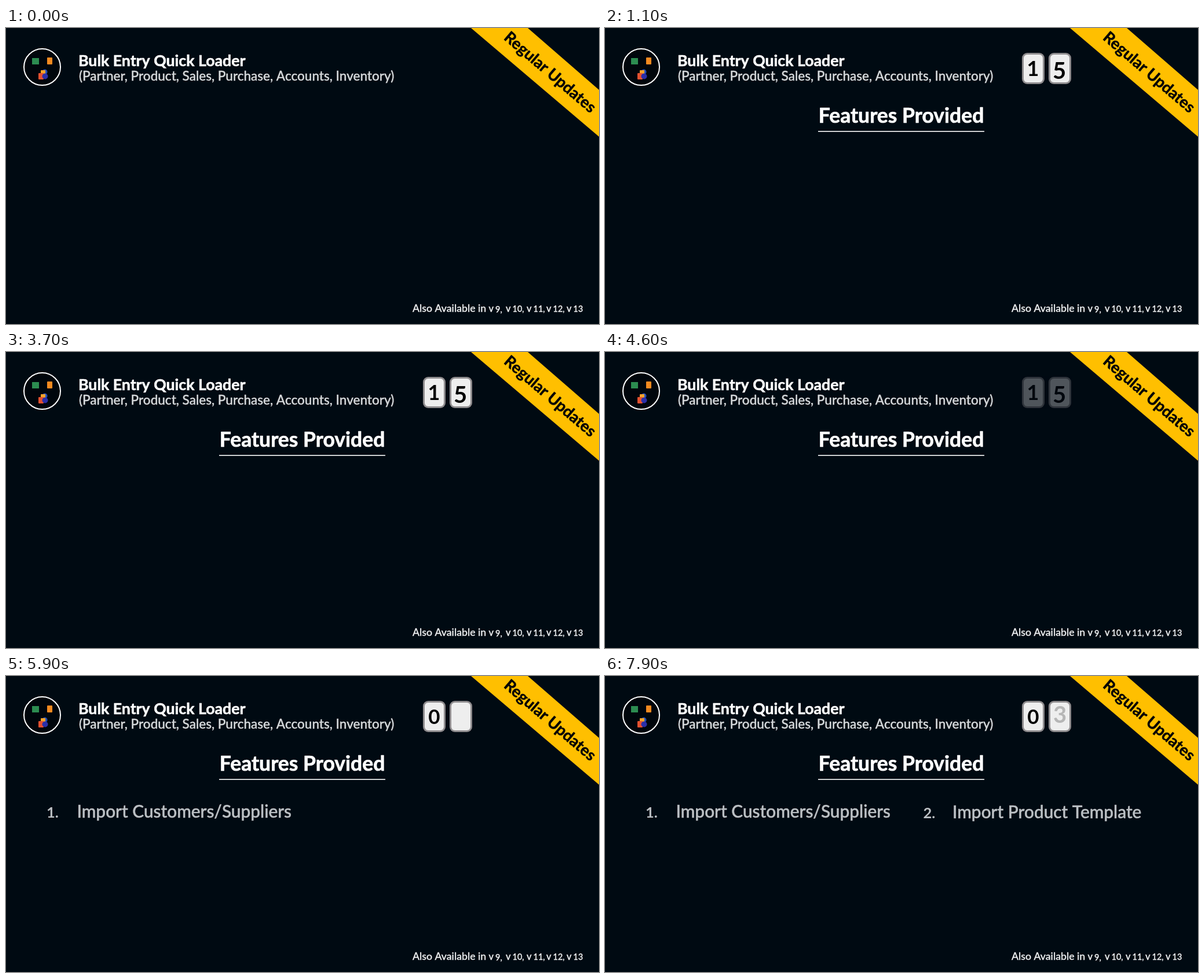
Animation, 1024 px wide and 512 px high, one loop 8 s. Source, as an HTML page with a canvas:

```html
<!DOCTYPE html>
<html lang="en">
<head>
<meta charset="utf-8">
<title>Features Provided</title>
<style>
  html, body { margin: 0; width: 100%; height: 100%; overflow: hidden; background: #000a12; }
  canvas { display: block; }
</style>
</head>
<body>
<canvas id="stage" width="1024" height="512"></canvas>
<script>
const ctx = document.getElementById('stage').getContext('2d');
const LOOP = 8000, STEP = 100;
const BG = '#000a12', WHITE = '#ffffff', SOFT = '#d6d8da', ITEM = '#bcc0c4', AMBER = '#ffbf00';

// size and baseline of the counter digits, with low-hanging 3 and 5
const DIGITS = { 0: [35, 83], 1: [36, 83], 2: [36, 84], 3: [40, 89], 5: [40, 88] };

// bold is the width of an outline that thickens the letters
function text(str, x, y, size, weight, color, align = 'left', bold = 0) {
  ctx.font = `${weight} ${size}px Lato, "Open Sans", sans-serif`;
  ctx.fillStyle = ctx.strokeStyle = color;
  ctx.textAlign = align;
  ctx.fillText(str, x, y);
  if (bold) {
    ctx.lineWidth = bold;
    ctx.lineJoin = 'round';
    ctx.strokeText(str, x, y);
  }
}

function box(x, y, w, h, r, color) {
  ctx.fillStyle = color;
  ctx.beginPath();
  ctx.roundRect(x, y, w, h, r);
  ctx.fill();
}

function disc(x, y, r, color) {
  ctx.fillStyle = color;
  ctx.beginPath();
  ctx.arc(x, y, r, 0, Math.PI * 2);
  ctx.fill();
}

function withAlpha(alpha, draw) {
  if (alpha <= 0) return;
  ctx.save();
  ctx.globalAlpha = alpha;
  draw();
  ctx.restore();
}

// stepped rise from 0 to 1 over n ticks; the first tick is already visible
function ramp(t, start, n) {
  const k = Math.floor((t - start) / STEP) + 1;
  return Math.min(Math.max(k, 0), n) / n;
}

function badge() {
  disc(62.5, 67.5, 31.5, '#00060c');
  ctx.strokeStyle = WHITE;
  ctx.lineWidth = 2;
  ctx.stroke();
  box(45, 52, 12, 11, 0, '#2c8c50');
  box(71, 51, 9, 12, 1, '#f58a1f');
  disc(67, 76, 4.5, '#2450b8');
  box(60, 73, 8, 9, 1, '#f9a42b');
  box(56, 78, 9, 11, 1, '#e4512f');
  disc(67.5, 83.5, 5, '#2b2fa8');
}

function ribbon() {
  ctx.fillStyle = AMBER;
  ctx.beginPath();
  ctx.moveTo(803, 0);
  ctx.lineTo(901, 0);
  ctx.lineTo(1024, 107);
  ctx.lineTo(1024, 188);
  ctx.fill();
  ctx.save();
  ctx.translate(933.6, 83.4);
  ctx.rotate(40.6 * Math.PI / 180);
  text('Regular Updates', 0, 0, 27.2, 700, '#050505', 'center', 0.5);
  ctx.restore();
}

function footer() {
  const put = (str, x, y, size) => text(str, x, y, size, 500, '#eeeff0', 'left', 0.35);
  put('Also Available in', 702, 490.5, 17.7);
  [[9, 833.5], [10, 863], [11, 899], [12, 933], [13, 968]].forEach(([n, x]) => {
    put('v', x, 490.5, 16.5);
    put(n < 13 ? n + ',' : n, x + 11.5, n === 9 ? 492 : 490.5, 14.5);
  });
}

function heading(t) {
  withAlpha(ramp(t, 100, 4), () => {
    text('Features Provided', 511.5, 163.5, 35.5, 700, WHITE, 'center', 0.7);
    ctx.fillRect(368, 178, 287, 1.6);
  });
}

function card(x) {
  box(x, 43, 39, 54, 9, '#8f8c8e');
  box(x + 3, 46, 33, 48, 6, '#eeeeee');
}

function digit(d, x, dy = 0, alpha = 1) {
  const [size, base] = DIGITS[d];
  withAlpha(alpha, () => text(String(d), x, base + dy, size, 700, '#030303', 'center'));
}

// the old digit sinks and fades, then the next one drops in
function roll(from, k) {
  if (k <= 0) digit(from, 785.5);
  else if (k < 3) digit(from, 785.5, 5 * k, 1 - k / 3);
  else if (k > 3) {
    const p = Math.min((k - 3) / 3, 1);
    digit(from + 1, 785.5, -12 * (1 - p), p ** 1.3);
  }
}

function counter(t) {
  const total = t < 4800;
  const alpha = total ? ramp(t, 900, 3) - ramp(t, 4500, 3) : ramp(t, 4900, 4);
  if (alpha <= 0) return;
  card(720);
  card(766);
  if (total) {
    const hidden = t >= 1900 && (t - 1900) % 1300 < 500 && t < 3700;
    if (!hidden) {
      digit(1, 739);
      digit(5, 784.5);
    }
  } else {
    digit(0, 739.5);
    const late = t >= 7000;
    roll(late ? 2 : 1, Math.floor((t - (late ? 7600 : 5700)) / STEP) + 1);
  }
  // fade the whole group by veiling it with the backdrop
  withAlpha(1 - alpha, () => {
    ctx.fillStyle = BG;
    ctx.fillRect(718, 41, 89, 58);
  });
}

function feature(t, start, n, label, numX, x, base) {
  const p = ramp(t, start, 4);
  const y = base - 17 * (1 - p);
  withAlpha(p ** 0.75, () => {
    text(n + '.', numX, y, 25.5, 700, ITEM);
    text(label, x, y, 29.8, 500, ITEM, 'left', 0.5);
  });
}

function draw(t) {
  ctx.fillStyle = BG;
  ctx.fillRect(0, 0, 1024, 512);
  badge();
  text('Bulk Entry Quick Loader', 125, 66, 26.7, 700, WHITE, 'left', 0.6);
  text('(Partner, Product, Sales, Purchase, Accounts, Inventory)', 126, 91, 22.5, 500, SOFT, 'left', 0.4);
  ribbon();
  footer();
  heading(t);
  counter(t);
  feature(t, 4900, 1, 'Import Customers/Suppliers', 70, 122.5, 245);
  feature(t, 6700, 2, 'Import Product Template', 549.5, 600, 246);
}

const begin = performance.now();
function tick() {
  draw((performance.now() - begin) % LOOP);
  requestAnimationFrame(tick);
}
tick();
</script>
</body>
</html>
```
